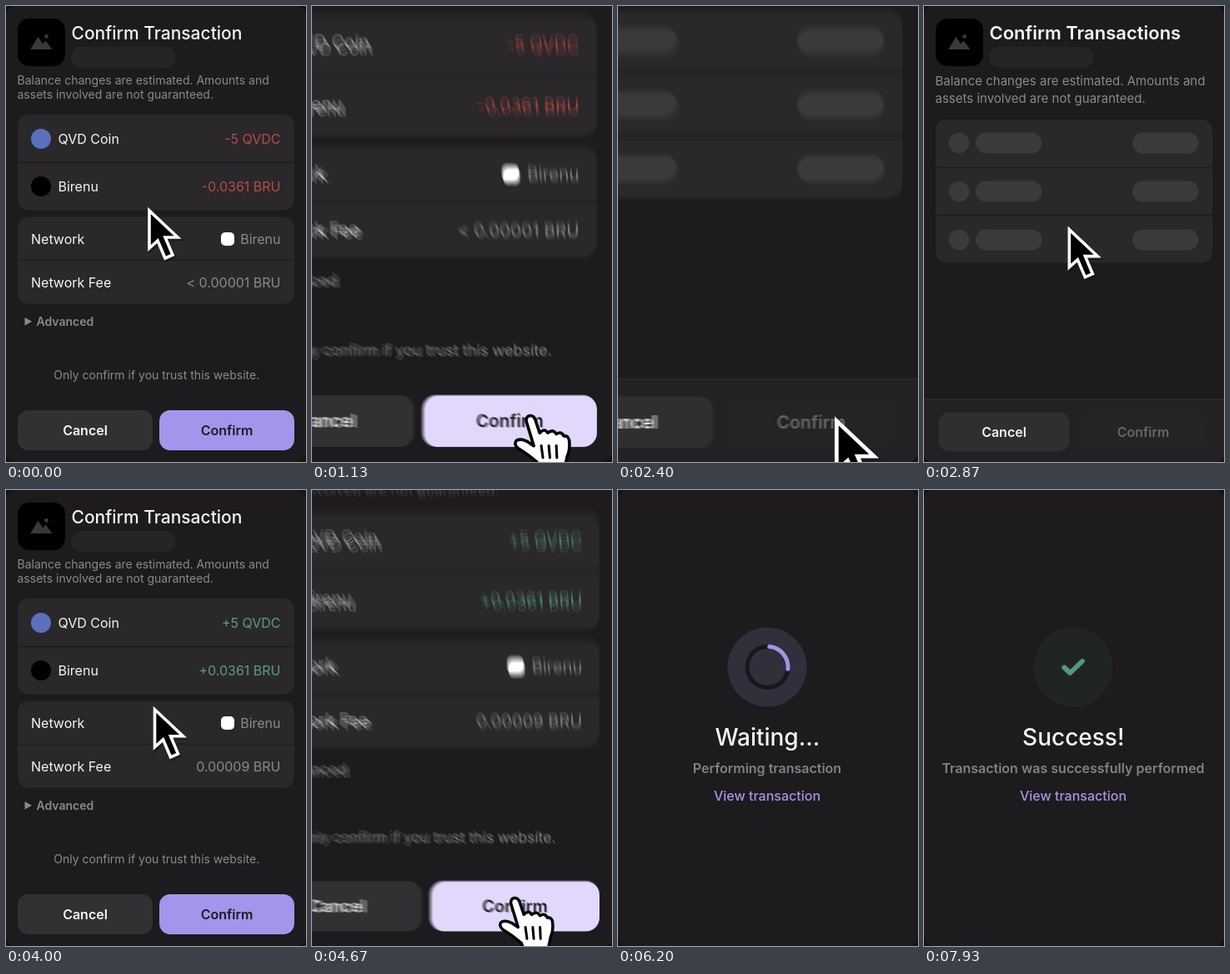
An HTML page for the animation above (8000 ms loop, 360 px wide and 546 px high).

```html
<!DOCTYPE html>
<html lang="en">
<head>
<meta charset="utf-8">
<title>Confirm transaction</title>
<style>
  html, body { margin: 0; width: 100%; height: 100%; overflow: hidden; background: #111012; }
  svg { display: block; width: 100vw; height: 100vh; }
  text { font-family: Inter, "Open Sans", sans-serif; white-space: pre; }
</style>
</head>
<body>
<svg id="stage" viewBox="0 0 360 546"></svg>
<script>
const LOOP = 8000;
const WHITE = '#f6f5f7', GREY = '#8b898c', RED = '#b64c45', GREEN = '#5b9d80';
const BG = '#1d1b1e', CARD = '#2a282b', PURPLE = '#a594eb', HOVER = '#e1d8fc';

// Shape helpers
const box = (x, y, w, h, r, fill, extra = '') =>
  `<rect x="${x}" y="${y}" width="${w}" height="${h}" rx="${r}" fill="${fill}" ${extra}/>`;
const dot = (x, y, r, fill, extra = '') =>
  `<circle cx="${x}" cy="${y}" r="${r}" fill="${fill}" ${extra}/>`;
const label = (str, x, y, size, fill, weight = 400, anchor = 'start') =>
  `<text x="${x}" y="${y}" font-size="${size}" fill="${fill}" font-weight="${weight}" text-anchor="${anchor}">${str}</text>`;
const left = (str, y) => label(str, 30, y, 16, WHITE);
const right = (str, y, fill) => label(str, 329.5, y, 16, fill, 400, 'end');
const mid = (str, x, y, size, fill, weight) => label(str, x, y, size, fill, weight, 'middle');
const line = y => box(14, y - 1, 332, 2, 0, '#201e21');

const header = (title, size, weight) =>
  box(14, 15, 57, 57, 14, '#000') +
  `<path d="M30 51.5 L38.5 37.5 L44 46 L47.5 42 L54.5 51.5 Z" fill="#39383a" stroke="#39383a" stroke-linejoin="round"/>` +
  dot(48.5, 36.5, 2.4, '#39383a') +
  box(78, 49, 125.5, 25, 12.5, '#262427') +
  label(title, 78.5, 40.3, size, WHITE, weight);

const notice = (size, y1, y2) =>
  label('Balance changes are estimated. Amounts and', 13.5, y1, size, GREY) +
  label('assets involved are not guaranteed.', 13.5, y2, size, GREY);

function review(coin, token, fee, tint) {
  return header('Confirm Transaction', 21, 500) + notice(14, 94, 110.5) +
    box(14, 130, 332, 114.5, 13, CARD) + line(187.5) +
    dot(42, 159, 12, '#5a70bd') + label('QVD Coin', 62.5, 164.6, 16, WHITE) + right(coin, 164.6, tint) +
    dot(42, 216, 12, '#000') + label('Birenu', 62.5, 222, 16, WHITE) + right(token, 222, tint) +
    box(14, 252.5, 332, 104, 13, CARD) + line(304.5) +
    left('Network', 284.6) + box(258, 271, 16, 16, 5, '#fff') + right('Birenu', 284.6, GREY) +
    left('Network Fee', 337) + right(fee, 337, GREY) +
    `<path d="M22.5 373 L31 377.7 L22.5 382.5 Z" fill="${GREY}"/>` +
    label('Advanced', 36.5, 383, 14, GREY, 600) +
    mid('Only confirm if you trust this website.', 180.8, 447.3, 14, GREY, 400) +
    box(14, 484, 162, 48, 13, '#323033') + mid('Cancel', 95, 513.6, 16, WHITE, 600) +
    box(184, 484, 162, 48, 13, PURPLE, 'class="ok"') + mid('Confirm', 265, 513.6, 16, BG, 600);
}

function skeleton() {
  const rows = [164, 222, 280].map(y =>
    dot(42, y, 12.3, '#3b393c') +
    box(62, y - 12.5, 79.5, 25, 12.5, '#3b393c') +
    box(250, y - 12.5, 79.5, 25, 12.5, '#3b393c')).join('');
  return header('Confirm Transactions', 22, 600) + notice(15, 94.7, 115.5) +
    box(14, 136, 332, 171.5, 13, CARD) + line(193.5) + line(251) + rows +
    `<path d="M0 471 H360 V536 Q360 546 350 546 H10 Q0 546 0 536 Z" fill="#232124"/>` +
    box(0, 470, 360, 1.5, 0, '#2d2b2e') +
    box(17.5, 486.5, 157, 47, 13, '#302e31') + mid('Cancel', 96, 515.7, 16, WHITE, 600) +
    box(185, 486.5, 155.5, 47, 13, '#252326') + mid('Confirm', 263, 515.7, 16, '#69676a', 600);
}

const result = (title, note, art) => art +
  mid(title, 179.3, 306.3, 28, WHITE, 500) +
  mid(note, 179, 339.4, 16, '#838184', 600) +
  mid('View transaction', 179, 371.5, 16, '#a895e0', 500);

const spinner =
  dot(179, 212, 47.5, '#322e3b') +
  dot(179.5, 212, 24.5, 'none', 'stroke="#19171a" stroke-width="5"') +
  `<path id="arc" d="M179.5 187.5 A24.5 24.5 0 0 1 204 212" fill="none" stroke="#a594e6" stroke-width="5" stroke-linecap="round"/>`;
const tick =
  dot(179, 212, 47.5, '#212425') +
  `<path id="tick" d="M168.3 212.5 L175.3 219 L190 205" pathLength="100" stroke-dasharray="100 200" fill="none" stroke="#549a78" stroke-width="5.8" stroke-linecap="round" stroke-linejoin="round"/>`;

const arrow = `<g id="arrow">
  <path d="M2 4 V49 L12 40 L21 61 L30 57 L21 36 H36 Z" fill="#000" stroke="#000" stroke-width="5" opacity=".25" transform="translate(1.5 2)"/>
  <path d="M2 4 V49 L12 40 L21 61 L30 57 L21 36 H36 Z" fill="#000" stroke="#fff" stroke-width="3.6"/></g>`;
const hand = `<g id="hand" stroke="#000" stroke-linecap="round" stroke-linejoin="round">
  <path d="M-4 4 Q-4 -1 0 -1 Q3 -1 4.5 3 L8.5 15 Q13 10 16 15 Q21 11 24 16 Q29 13 31 18
    Q35 17 36 22 Q37 31 34 37 L32 47 H8 L6 42 Q-2 35 -12 29 Q-16 25 -13 22 Q-9 20 -3 23 L3 27 Z"
    fill="#fff" stroke-width="2.8"/>
  <path d="M10 27 L11.5 38 M17 27 L18 38 M24 27 L24.5 38" fill="none" stroke-width="2.4"/></g>`;

const pages = [
  [0, review('-5 QVDC', '-0.0361 BRU', '&lt; 0.00001 BRU', RED)],
  [2235, skeleton()],
  [2970, review('+5 QVDC', '+0.0361 BRU', '0.00009 BRU', GREEN)],
  [5440, result('Waiting...', 'Performing transaction', spinner)],
  [6900, result('Success!', 'Transaction was successfully performed', tick)]
];

// Blended copies of the panel give the zoom its motion blur
const SHOTS = 6, SHUTTER = 16;
const panel = `<g id="panel">${box(0, 0, 360, 546, 10, BG)}` +
  pages.map(p => `<g class="page">${p[1]}</g>`).join('') + '</g>';
const stage = document.getElementById('stage');
stage.innerHTML = box(0, 0, 360, 546, 0, '#111012') +
  Array.from({ length: SHOTS }, (_, i) =>
    `<g class="shot" opacity="${1 / (i + 1)}">${i ? '<use href="#panel"/>' : panel}</g>`).join('') +
  `<g id="cursor">${arrow}${hand}</g>`;
const $ = id => document.getElementById(id);
const groups = [...document.querySelectorAll('.page')];
const shots = [...document.querySelectorAll('.shot')];
const buttons = [...document.querySelectorAll('.ok')];

// Tracks: start value, then [start, end, value at end]
const zoomTrack = [1, [750, 1470, 1.497], [2080, 2800, 1], [4310, 5030, 1.5], [5050, 5770, 1]];
const xTrack = [170, [530, 1230, 285.5], [2300, 2990, 170], [3800, 4580, 265], [4600, 5400, 267]];
const yTrack = [241, [530, 1230, 507], [2300, 3090, 241], [3800, 4580, 501], [4600, 5400, 504.5]];

const ease = p => p < 0.5 ? 4 * p ** 3 : 1 - 4 * (1 - p) ** 3;
const clamp = p => Math.max(0, Math.min(1, p));
function at([value, ...steps], t) {
  for (const [start, end, next] of steps) value += (next - value) * ease(clamp((t - start) / (end - start)));
  return value;
}
const show = (el, on) => el.setAttribute('display', on ? 'inline' : 'none');
function camera(t) {
  const ox = t < 3500 ? 360 : 350;
  return `translate(${ox} 546) scale(${at(zoomTrack, t)}) translate(${-ox} -546)`;
}

function draw(t) {
  const page = pages.filter(p => p[0] <= t).length - 1;
  groups.forEach((g, i) => show(g, i === page));

  const moving = at(zoomTrack, t - SHUTTER) !== at(zoomTrack, t + SHUTTER);
  shots.forEach((g, i) => {
    show(g, i === 0 || moving);
    g.setAttribute('transform', camera(moving ? t + SHUTTER * (i / (SHOTS - 1) - 0.5) : t));
  });

  const x = at(xTrack, t), y = at(yTrack, t);
  const over = page !== 1 && x > 184 && x < 346 && y > 484 && y < 532;
  $('cursor').setAttribute('transform', `${camera(t)} translate(${x} ${y})`);
  show($('cursor'), page < 3);
  show($('arrow'), !over);
  show($('hand'), over);
  buttons.forEach(b => b.setAttribute('fill', over ? HOVER : PURPLE));

  $('arc').setAttribute('transform', `rotate(${(t - 6200) * 0.36 + 5} 179.5 212)`);
  $('tick').setAttribute('stroke-dashoffset', 100 * (1 - clamp((t - 6890) / 170)));
}

const begin = performance.now();
function frame() {
  draw((performance.now() - begin) % LOOP);
  requestAnimationFrame(frame);
}
frame();
</script>
</body>
</html>
```
